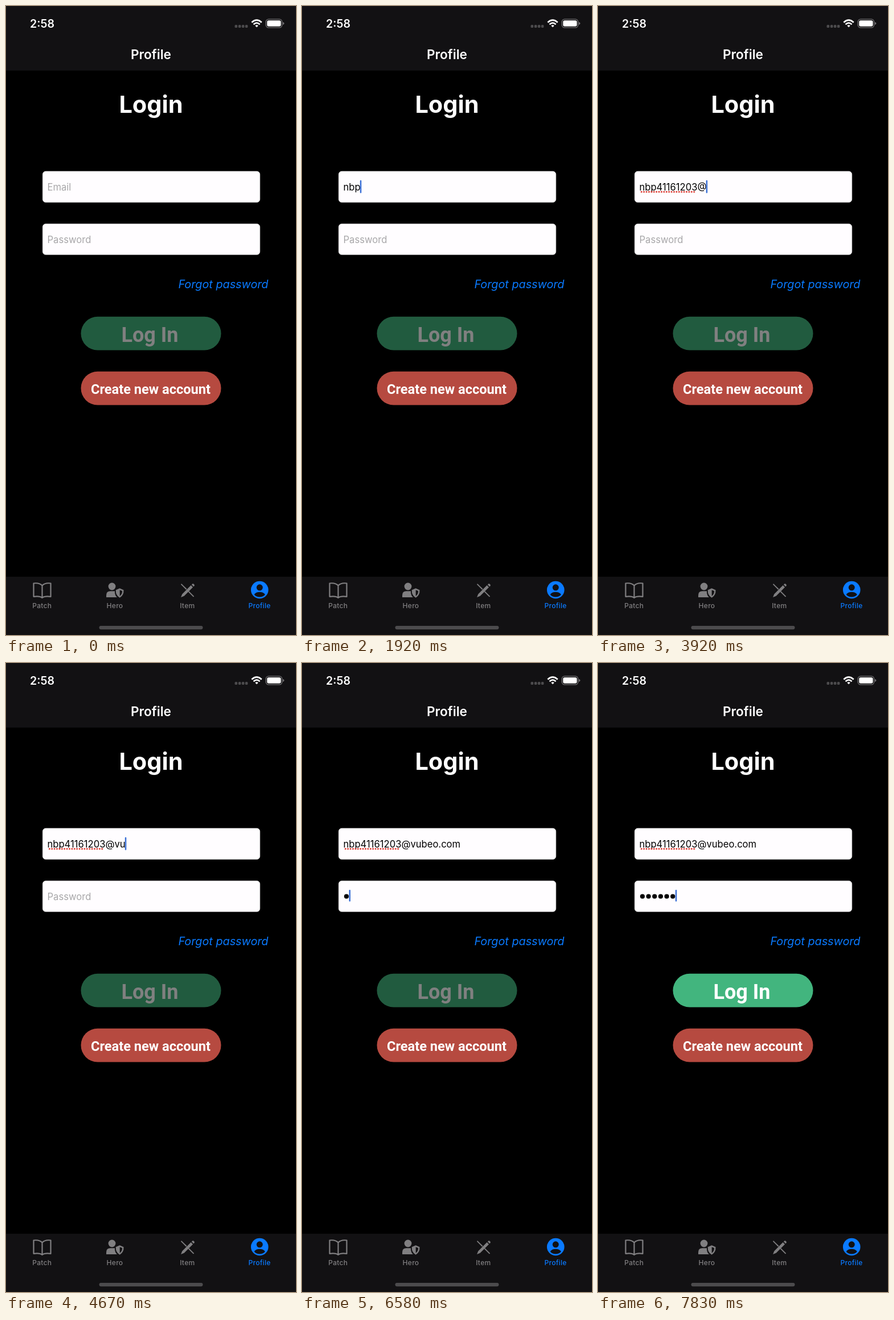
Write an HTML page that moves like this. It is 509 px wide and 1101 px high and loops after 8 s.

```html
<!DOCTYPE html>
<html lang="en">
<head>
<meta charset="utf-8">
<title>Login</title>
<style>
  html, body { margin: 0; width: 100%; height: 100%; overflow: hidden; background: #000; }
  svg { display: block; width: 100vw; height: 100vh; font-family: Inter, sans-serif; }
  .mid { text-anchor: middle; }
  .field { font-size: 16.6px; }
  .hint { fill: #a8a7a9; }
  .button { font-family: Roboto, sans-serif; font-weight: 700; fill: #fff; }
  .tab { font-size: 12px; font-weight: 500; letter-spacing: .3px; }
  .line { fill: none; stroke: #807f81; stroke-width: 2.2; stroke-linecap: round; stroke-linejoin: round; }
</style>
</head>
<body>
<svg viewBox="0 0 509 1101">
  <rect width="509" height="1101"/>
  <path d="M0 0H509V113H0ZM0 999H509V1101H0Z" fill="#121113"/>

  <!-- status bar -->
  <text x="42" y="37.5" font-size="19.6" font-weight="600" fill="#fff">2:58</text>
  <g fill="#4c4b4d">
    <rect x="401.5" y="33" width="4.6" height="5" rx="1.5"/>
    <rect x="407.8" y="33" width="4.6" height="5" rx="1.5"/>
    <rect x="413.8" y="33" width="4.6" height="5" rx="1.5"/>
    <rect x="419.8" y="33" width="4.6" height="5" rx="1.5"/>
  </g>
  <g fill="none" stroke="#fff" stroke-width="2.7">
    <path d="M431.3 28.7Q440 20.6 448.7 28.7M434.5 32.2Q440 27.2 445.5 32.2"/>
    <path d="M440 37.2L437.3 34.4Q440 32.2 442.7 34.4Z" fill="#fff" stroke="none"/>
  </g>
  <rect x="456.2" y="23.2" width="28.3" height="14.6" rx="4.6" fill="none" stroke="#777678" stroke-width="1.3"/>
  <rect x="458.2" y="25.2" width="24.3" height="10.6" rx="2.8" fill="#fff"/>
  <path d="M486 28Q488.3 28.6 488.3 30.5T486 33Z" fill="#777678"/>

  <text class="mid" x="254.5" y="93" font-size="22.6" font-weight="600" fill="#fff">Profile</text>
  <text class="mid" x="254.5" y="186.5" font-size="41.5" font-weight="700" fill="#fff">Login</text>

  <!-- form -->
  <g fill="#fffdff" stroke="#d4d3d5" stroke-width=".7">
    <rect x="64.3" y="289.3" width="381.4" height="54.4" rx="5.5"/>
    <rect x="64.3" y="381.3" width="381.4" height="54" rx="5.5"/>
  </g>
  <text id="email" class="field" x="72.5" y="322.5"></text>
  <path id="squiggle" fill="none" stroke="#dc4038" stroke-width="3.1" stroke-linecap="round" stroke-dasharray="0 4.4"/>
  <text id="passwordHint" class="field hint" x="72.5" y="414.5">Password</text>
  <g id="bullets"></g>
  <rect id="caret" width="2.5" rx="1" fill="#3b70d6"/>

  <text x="460.5" y="494" text-anchor="end" font-size="19.8" font-style="italic" fill="#0a7aff">Forgot password</text>
  <g id="login">
    <rect x="131.5" y="543.8" width="246" height="58.8" rx="29.4" fill="#42b57e"/>
    <text class="button mid" x="252.5" y="588" font-size="36">Log In</text>
  </g>
  <rect x="131.5" y="639.7" width="246" height="58.8" rx="29.4" fill="#b64a40"/>
  <text class="button mid" x="254" y="679" font-size="23.6">Create new account</text>

  <!-- tab bar -->
  <path class="line" d="M63.5 1014.5C60 1010.5 54 1009.8 48.5 1010.5V1033.8C54 1033 60 1033 63.5 1035.8C67 1033 73 1033 78.5 1033.8V1010.5C73 1009.8 67 1010.5 63.5 1014.5V1035.5"/>
  <g fill="#807f81">
    <circle cx="186" cy="1016" r="6.4"/>
    <path d="M176 1035V1031.5Q176 1024.3 183 1024.3H191V1027Q191.5 1032 195 1035Z"/>
    <path d="M199.6 1019.3L206.5 1022.2Q207 1031.5 199.6 1035.8Q192.2 1031.5 192.7 1022.2Z"/>
    <path d="M199.7 1022.2L204 1024Q204 1029.8 199.7 1032.8Z" fill="#121113"/>
  </g>
  <path class="line" stroke-width="1.8" style="stroke-width:1.8" d="M308 1012.3L316.2 1020.5M321 1025.3L329 1033.4"/>
  <path d="M307 1035L309.2 1029.4L324.6 1014L328 1017.4L312.6 1032.8ZM325.8 1012.8L327.2 1011.4Q328.2 1010.8 329.2 1011.6L330.4 1012.8Q331.2 1013.8 330.5 1014.9L329.2 1016.2Z" fill="#807f81"/>
  <circle cx="445.2" cy="1022" r="15.3" fill="#0a7aff"/>
  <g fill="#121113">
    <circle cx="445.2" cy="1017.8" r="5.5"/>
    <path d="M435.6 1030.2Q438.6 1025.8 445.2 1025.8T454.8 1030.2Q451 1034.6 445.2 1034.6T435.6 1030.2Z"/>
  </g>
  <g class="tab mid" fill="#807f81">
    <text x="63.3" y="1054">Patch</text>
    <text x="191" y="1054">Hero</text>
    <text x="318.3" y="1054">Item</text>
    <text x="445" y="1054" fill="#0a7aff">Profile</text>
  </g>
  <rect x="163.5" y="1085" width="182" height="6.2" rx="3.1" fill="#4c4b4d"/>
</svg>
<script>
const LOOP = 8000, FOCUS_EMAIL = 670, FOCUS_PASSWORD = 6000, LEFT = 72.5, BULLET_STEP = 10.65;
const address = 'nbp41161203@vubeo.com';
const nameLength = address.indexOf('@');
const emailKeys = [1420, 1670, 1920, 2080, 2250, 2420, 2750, 2920, 3170, 3420, 3670, 3920,
  4250, 4580, 4830, 5000, 5080, 5250, 5330, 5420, 5580];
const passwordKeys = [6580, 7000, 7170, 7420, 7670, 7830];

const $ = id => document.getElementById(id);
const email = $('email'), squiggle = $('squiggle'), bullets = $('bullets'), caret = $('caret');
const typed = (keys, t) => keys.filter(k => k <= t).length;
const show = (el, on) => el.setAttribute('visibility', on ? 'visible' : 'hidden');

bullets.innerHTML = passwordKeys.map((_, i) =>
  `<circle cx="${78 + i * BULLET_STEP}" cy="408.5" r="4.1"/>`).join('');

function placeCaret(x, y, height) {
  caret.setAttribute('x', x);
  caret.setAttribute('y', y);
  caret.setAttribute('height', height);
}

function draw(t) {
  const count = typed(emailKeys, t), secret = typed(passwordKeys, t);
  email.textContent = count ? address.slice(0, count) : 'Email';
  email.classList.toggle('hint', !count);

  show(squiggle, count > nameLength);
  if (count > nameLength) {
    const end = LEFT + email.getSubStringLength(0, nameLength) - 3;
    squiggle.setAttribute('d', `M76.3 325.3H${end}`);
  }

  show($('passwordHint'), !secret);
  [...bullets.children].forEach((dot, i) => show(dot, i < secret));

  show(caret, t >= FOCUS_EMAIL);
  if (t < FOCUS_PASSWORD) placeCaret(LEFT + (count ? email.getComputedTextLength() - .8 : 0), 305, 22.5);
  else placeCaret(LEFT + secret * BULLET_STEP - .6, 397, 20.5);

  // the button brightens over a quarter second once both fields hold text
  const fade = Math.floor((t - passwordKeys[0]) / 83) / 3;
  $('login').setAttribute('opacity', .5 + .5 * Math.min(1, Math.max(0, fade)));
}

function tick() {
  draw(performance.now() % LOOP);
  requestAnimationFrame(tick);
}
tick();
</script>
</body>
</html>
```
